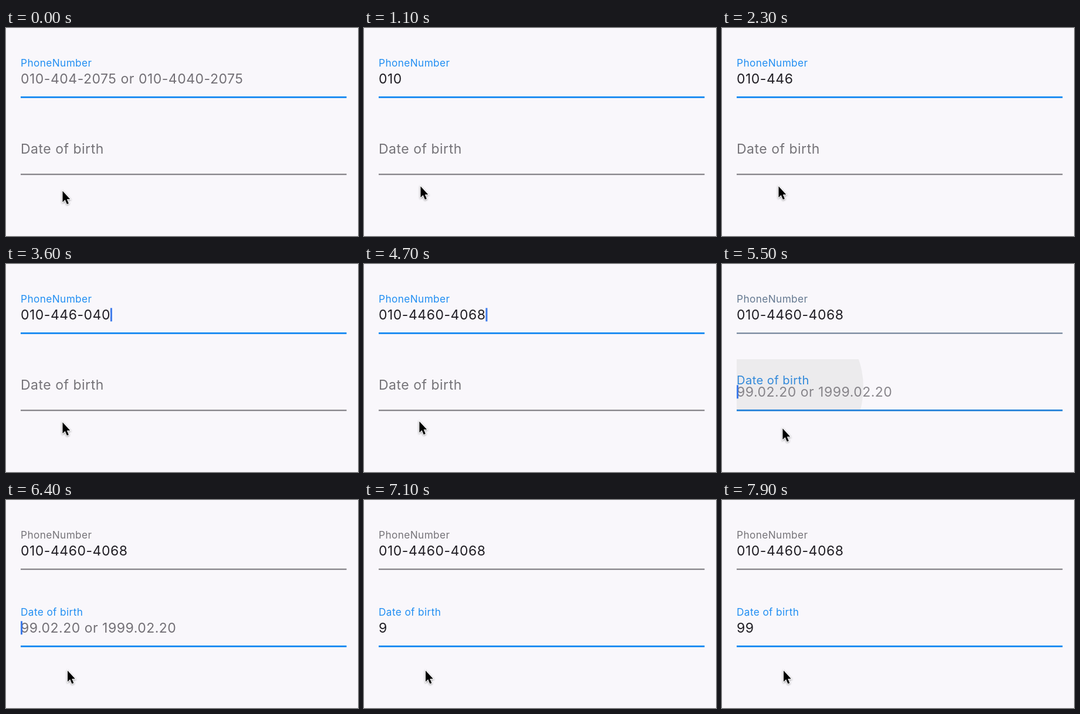
Write an HTML page that moves like this. It is 600x356 px and loops after 8 s.

```html
<!DOCTYPE html>
<html lang="en">
<head>
<meta charset="utf-8">
<title>Form fields</title>
<style>
html, body { margin: 0; width: 100%; height: 100%; overflow: hidden; background: #f9f7fb; }
svg { display: block; width: 600px; height: 356px; }
text { font: 23px Inter, Roboto, sans-serif; font-optical-sizing: none; letter-spacing: .5px; white-space: pre; }
.value { fill: #201e24; }
.hint { fill: #737076; }
</style>
</head>
<body>
<svg viewBox="0 0 600 356">
  <clipPath id="box"><path d="M25 163H580.5V250H25Z"/></clipPath>
  <g clip-path="url(#box)"><circle id="ripple" cx="95" cy="211" fill="#ecebed"/></g>
  <g id="phone"></g>
  <g id="birth"></g>
  <rect id="caret" width="3" height="23" fill="#3f7bea"/>
  <path id="mouse" d="M1 1.5V20.5L5.2 16.5 8.4 24 11.4 22.7 8.3 15.4H13.8Z" stroke="#fff" stroke-width="2"
    paint-order="stroke" style="filter:drop-shadow(0 1.5px 1.5px #0006)"/>
</svg>
<script>
const LOOP = 8000, STEP = 100, LEFT = 25;
const SWITCH = 5400; // focus moves to the second field
const BLUE = '#208ef2', GREY = '#757378';
const $ = id => document.getElementById(id);

const ramp = (t, start, length) => Math.min(1, Math.max(0, (t - start) / length));
const mix = (a, b, p) => a + (b - a) * p;
const smooth = p => p * p * (3 - 2 * p);
const easeIn = p => p * p;
const easeOut = p => 1 - (1 - p) ** 5;

// Bursts of typing: start, time per key, number of keys.
const phoneBursts = [[800, 150, 3], [1700, 300, 4], [3400, 200, 3], [4300, 100, 1]];
const birthBursts = [[7000, 200, 2]];
const typed = (bursts, t) => bursts.reduce((sum, [start, gap, keys]) =>
  sum + Math.min(keys, Math.max(0, Math.floor((t - start) / gap) + 1)), 0);

function makeField(id, label, hint, baseline, lineY) {
  $(id).innerHTML = `<text>${label}</text>
    <text class="hint" x="${LEFT}" y="${baseline}">${hint}</text>
    <text class="value" x="${LEFT}" y="${baseline}"></text>
    <path d="M${LEFT} ${lineY}H580.5"/>`;
  const [labelEl, hintEl, valueEl, line] = $(id).children;
  return { labelEl, hintEl, valueEl, line, baseline };
}

const phone = makeField('phone', 'PhoneNumber', '010-404-2075 or 010-4040-2075', 95.3, 118.5);
const birth = makeField('birth', 'Date of birth', '99.02.20 or 1999.02.20', 227.3, 250.5);

function drawField(f, { value, hint, labelY, scale, focused, tint }) {
  const color = `color-mix(in srgb, ${BLUE} ${tint * 100}%, ${GREY})`;
  f.labelEl.setAttribute('transform', `translate(${LEFT} ${labelY}) scale(${scale})`);
  f.labelEl.style.fill = color;
  f.hintEl.setAttribute('opacity', hint);
  f.valueEl.textContent = value;
  f.line.style.stroke = color;
  f.line.setAttribute('stroke-width', focused ? 2.9 : 1.8);
}

function formatPhone(digits) {
  const mid = digits.length > 10 ? 7 : 6;
  return [digits.slice(0, 3), digits.slice(3, mid), digits.slice(mid)].filter(Boolean).join('-');
}

// The pointer nudges up, glides to the second field, then drops below it.
function mouseAt(t) {
  const go = ramp(t, 4600, 600), back = easeOut(ramp(t, SWITCH, 300));
  const y = mix(t < STEP ? 277.5 : 269.5, 211, easeIn(go));
  return [mix(mix(95.5, 92, easeOut(go)), 104, back), mix(y, 290.5, back)];
}

function draw(now) {
  const t = Math.floor(now % LOOP / STEP) * STEP;
  const onBirth = t >= SWITCH;
  const rise = smooth(ramp(t, SWITCH - 50, 300));
  const tint = smooth(ramp(t, SWITCH - 100, 280)) * onBirth;

  drawField(phone, {
    value: formatPhone('01044604068'.slice(0, typed(phoneBursts, t))),
    hint: 1 - ramp(t, 700, 150),
    labelY: 66, scale: .75, focused: !onBirth, tint: 1 - tint
  });
  drawField(birth, {
    value: '99'.slice(0, typed(birthBursts, t)),
    hint: ramp(t, SWITCH, 120) * (1 - ramp(t, 6900, 150)),
    labelY: mix(214.8, 198, rise), scale: mix(1, .75, rise), focused: onBirth, tint
  });

  const { valueEl, baseline } = onBirth ? birth : phone;
  const width = valueEl.textContent ? valueEl.getComputedTextLength() : 0;
  const blinkStart = onBirth ? SWITCH : -500;
  $('caret').setAttribute('x', LEFT + width);
  $('caret').setAttribute('y', baseline - 20);
  $('caret').setAttribute('opacity', (t - blinkStart) % 1000 < 500 ? 1 : 0);

  $('ripple').setAttribute('r', onBirth ? 46 + t - SWITCH : 0);
  $('ripple').setAttribute('opacity', 1 - ramp(t, SWITCH + 100, 200));
  $('mouse').setAttribute('transform', `translate(${mouseAt(t)})`);
}

const start = performance.now();
function tick() {
  draw(performance.now() - start);
  requestAnimationFrame(tick);
}
tick();
</script>
</body>
</html>
```
